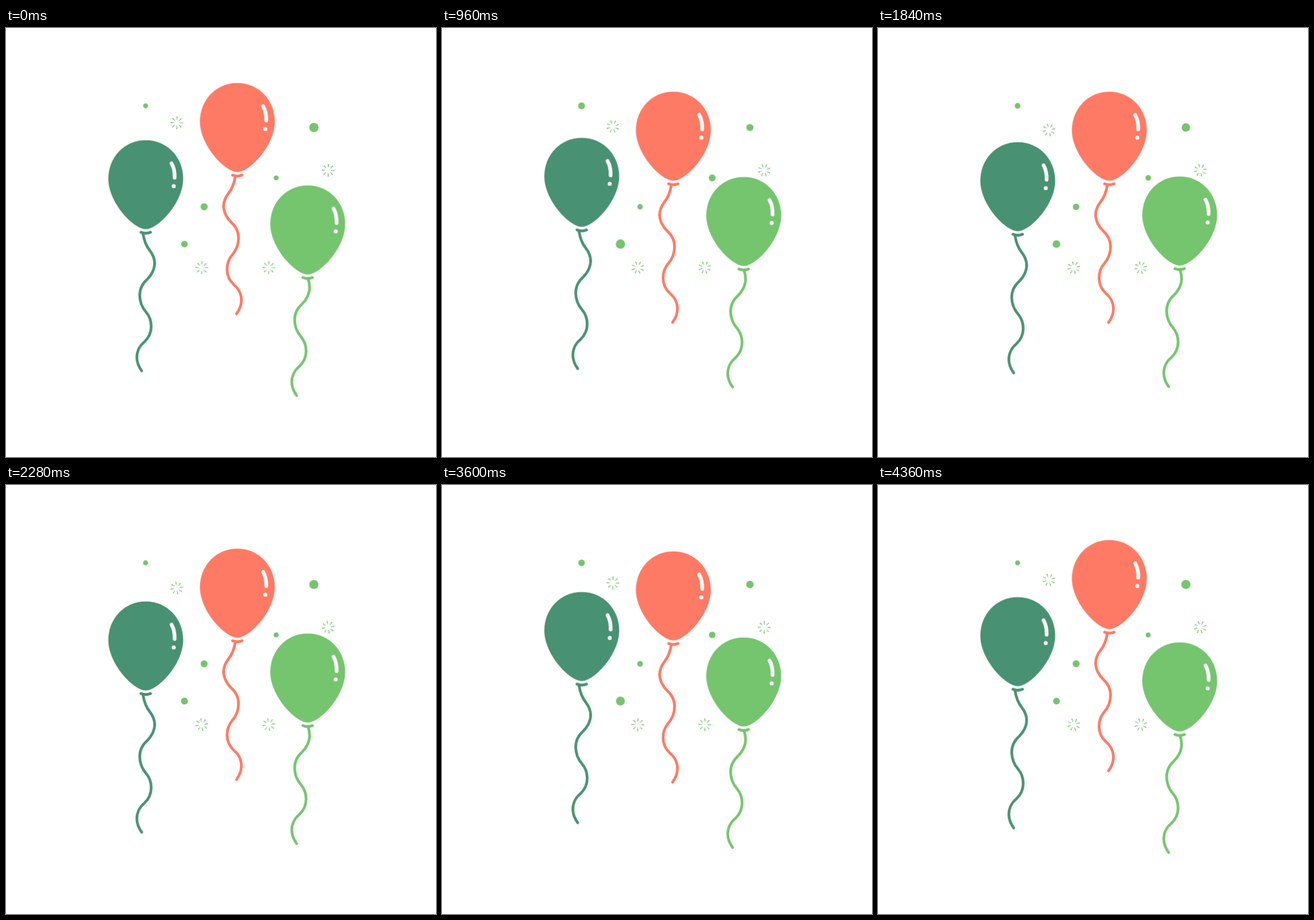
Recreate the animation shown at these times as an HTML page. Size 750x747 px, loop 4.4 s.

```html
<!DOCTYPE html>
<html lang="en">
<head>
<meta charset="utf-8">
<title>Balloons</title>
<style>
  html, body { margin: 0; width: 100%; height: 100%; overflow: hidden; background: #fff; }
  svg { display: block; width: 100%; height: 100%; }

  .red { color: #ff7a64; }
  .teal { color: #489172; }
  .green { color: #75c46e; }
  .string { fill: none; stroke: currentColor; stroke-width: 4.7; stroke-linecap: round; }
  .ray { fill: none; stroke: #75c46e; stroke-width: 6; stroke-dasharray: 1.4 4.883; stroke-dashoffset: .7; }
  .dot { fill: #75c46e; }

  .anim { animation: 4.4s linear infinite; }
  .red.anim { animation-name: bob-red; }
  .teal.anim { animation-name: bob-teal; animation-timing-function: ease-in-out; }
  .green.anim { animation-name: bob-green; animation-timing-function: cubic-bezier(.37, 0, .63, 1); }
  .spin { animation: spin 4.4s linear infinite; }
  .drift { animation: drift 2.2s linear infinite alternate; }
  .grow { animation: grow 1.1s linear infinite alternate; }
  .shrink { animation: shrink 1.1s linear infinite alternate; }

  @keyframes bob-red {
    0% { transform: translateY(0); animation-timing-function: ease-out; }
    25% { transform: translateY(15.6px); }
    34% { transform: translateY(16px); animation-timing-function: ease-in-out; }
    48.9% { transform: translateY(14.6px); animation-timing-function: ease-in-out; }
    68.2% { transform: translateY(25.6px); animation-timing-function: cubic-bezier(.55, 0, 1, 1); }
    88.6% { transform: translateY(12.8px); animation-timing-function: ease-out; }
    100% { transform: translateY(0); }
  }
  @keyframes bob-teal {
    0%, 100% { transform: translateY(0); }
    16.67% { transform: translateY(-4.8px); }
    33.33% { transform: translateY(-1.2px); }
    50% { transform: translateY(7.8px); }
    66.67% { transform: translateY(-8.6px); }
    83.33% { transform: translateY(-9px); }
  }
  @keyframes bob-green {
    0%, 100% { transform: translateY(0); }
    25% { transform: translateY(-15.3px); }
    50% { transform: translateY(-15.6px); }
    75% { transform: translateY(-10.5px); }
  }
  @keyframes spin { to { transform: rotate(935deg); } }
  @keyframes drift { to { transform: translateY(15px); } }
  @keyframes grow { to { transform: scale(1.46); } }
  @keyframes shrink { to { transform: scale(.73); } }
</style>
</head>
<body>
<svg viewBox="0 0 750 747">
  <defs>
    <g id="balloon">
      <path fill="currentColor" d="M0 95.8C38 95.8 65.3 126 65.3 163C65.3 204 22 250.7 0 250.7C-22 250.7-65.3 204-65.3 163C-65.3 126-38 95.8 0 95.8Z"/>
      <path class="string" style="stroke-width:5" d="M-8.2 256Q0 259.6 8.2 256"/>
      <path d="M45 136Q51 147 50.3 161" fill="none" stroke="#fff" stroke-width="6.5" stroke-linecap="round"/>
      <circle cx="48.8" cy="175.7" r="3.5" fill="#fff"/>
    </g>
    <path id="tail" class="string" d="M15.5 310C15.5 321 9 332 2.5 338C-5.5 345-10.5 355-10.5 366C-10.5 377-5.5 388 .5 395C6.5 402 9.5 410 9.5 420C9.5 430 5 440-2.5 447C-10 453-15.5 463-15.5 474C-15.5 483-12.5 490-7 497.5"/>
    <g id="string">
      <path class="string" d="M-4.7 259C-2.7 271 1 280 6.5 287C12 294 15.5 302 15.5 310"/>
      <use href="#tail"/>
    </g>
    <circle id="rays" class="ray" r="8"/>
  </defs>

  <g transform="translate(243.4 135.5)"><circle class="dot grow" r="4.3"/></g>
  <g transform="translate(471.2 261)"><circle class="dot grow" r="4.3"/></g>
  <g transform="translate(311.2 376.2)"><circle class="dot grow" r="5.8"/></g>
  <g transform="translate(537 173.2)"><circle class="dot shrink" r="8.1"/></g>
  <g transform="translate(345.5 311.3)"><circle class="dot shrink" r="6.2"/></g>

  <g transform="translate(298 165)"><g class="drift"><use href="#rays" class="spin"/></g></g>
  <g transform="translate(562 247.7)"><use href="#rays" class="spin"/></g>
  <g transform="translate(341.5 417.3)"><use href="#rays" class="spin"/></g>
  <g transform="translate(458.3 417.3)"><use href="#rays" class="spin"/></g>

  <g transform="translate(243.7 99.6)">
    <g class="teal anim">
      <use href="#balloon"/>
      <use href="#string"/>
    </g>
  </g>
  <g transform="translate(403.5 0)">
    <g class="red anim">
      <use href="#balloon"/>
      <use href="#string" transform="translate(-8.4 0) scale(-1 1)"/>
    </g>
  </g>
  <g transform="translate(526.2 178.4)">
    <g class="green anim">
      <use href="#balloon"/>
      <g transform="translate(-12.3 -36)">
        <path class="string" d="M12.8 294C14.7 299 15.5 304 15.5 310"/>
        <use href="#tail"/>
      </g>
    </g>
  </g>
</svg>
</body>
</html>
```
